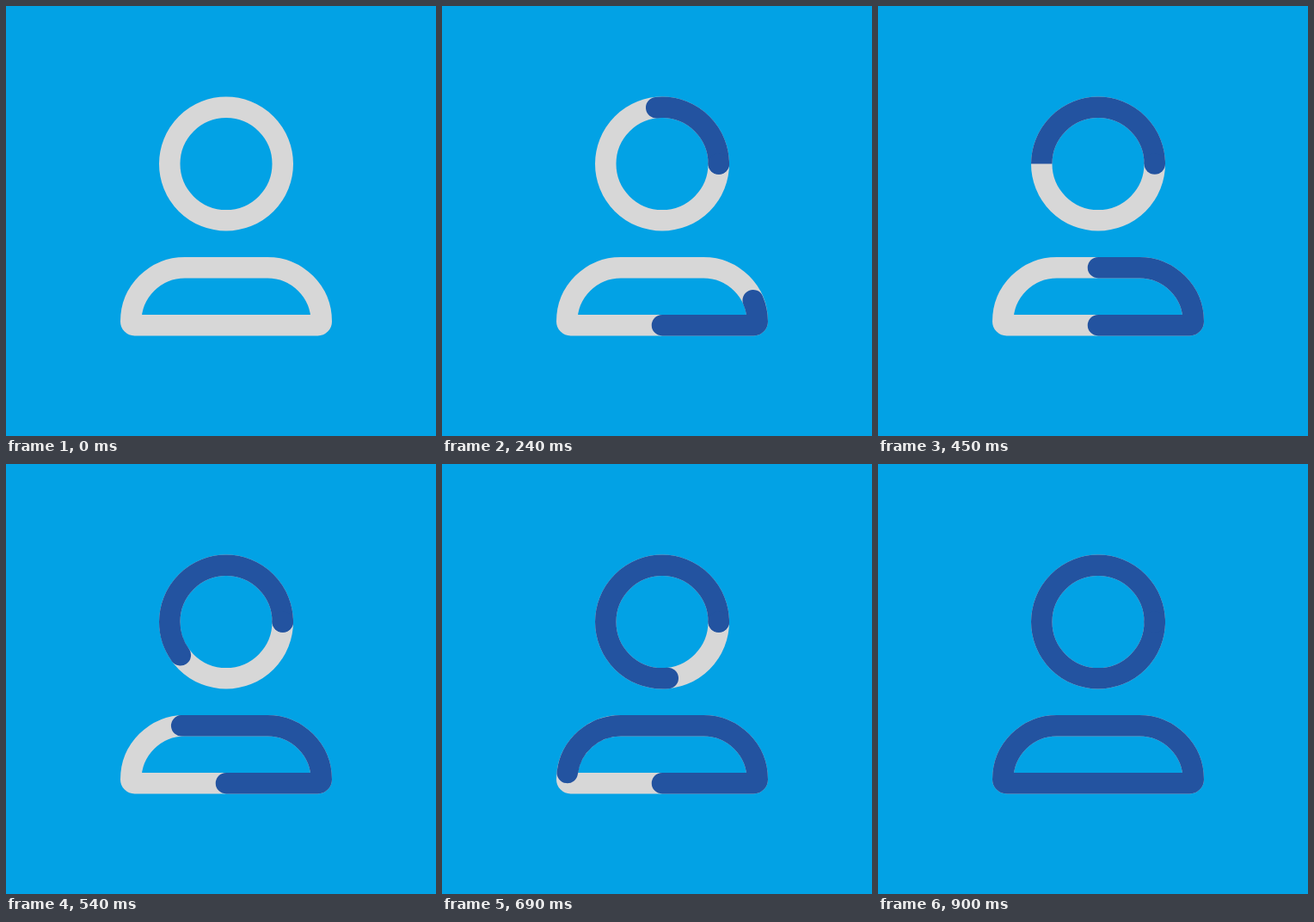
An HTML page for the animation above (0.93 s loop, 500 by 500 pixels).

```html
<!DOCTYPE html>
<html lang="en">
<head>
<meta charset="utf-8">
<title>Profile loader</title>
<style>
  html, body { margin: 0; width: 100%; height: 100%; overflow: hidden; background: #02a2e5; }
  svg { display: block; width: 100%; height: 100%; }
  path { fill: none; stroke-width: 24.5; }
  .track { stroke: #d7d7d7; }

  /* 31 held steps of 30 ms; the 1 ms lead keeps step edges clear of rounding */
  .ink, .dot { --beat: 930ms -1ms infinite; }
  .ink {
    stroke: #2353a0;
    stroke-dasharray: 1 2;
    animation: draw steps(31, jump-none) var(--beat), caps step-end var(--beat);
  }
  .head.ink { animation-name: draw, head-caps; }
  .dot { fill: #2353a0; animation: show step-end var(--beat); }

  @keyframes draw { from { stroke-dashoffset: 1; } to { stroke-dashoffset: 0; } }
  @keyframes caps {
    0% { stroke-linecap: butt; }
    3.2258%, 100% { stroke-linecap: round; }
  }
  /* the ring's leading end is flat at exactly half a turn */
  @keyframes head-caps {
    0%, 48.3871% { stroke-linecap: butt; }
    3.2258%, 51.6129%, 100% { stroke-linecap: round; }
  }
  @keyframes show {
    0% { visibility: hidden; }
    3.2258%, 100% { visibility: visible; }
  }
</style>
</head>
<body>
<svg viewBox="0 0 500 500">
  <path class="head track" d="M321.75 183.6A65.75 65.75 0 0 0 190.25 183.6A65.75 65.75 0 0 0 321.75 183.6Z"/>
  <path class="body track" d="M256 371.2H362.45A4.3 4.3 0 0 0 366.75 366.9A62.75 62.75 0 0 0 304 304.15H208A62.75 62.75 0 0 0 145.25 366.9A4.3 4.3 0 0 0 149.55 371.2Z"/>
  <path class="head ink" pathLength="1" d="M321.75 183.6A65.75 65.75 0 0 0 190.25 183.6A65.75 65.75 0 0 0 321.75 183.6"/>
  <circle class="dot" cx="321.75" cy="183.6" r="12.25"/>
  <path class="body ink" pathLength="1" d="M256 371.2H362.45A4.3 4.3 0 0 0 366.75 366.9A62.75 62.75 0 0 0 304 304.15H208A62.75 62.75 0 0 0 145.25 366.9A4.3 4.3 0 0 0 149.55 371.2H256"/>
</svg>
</body>
</html>
```
